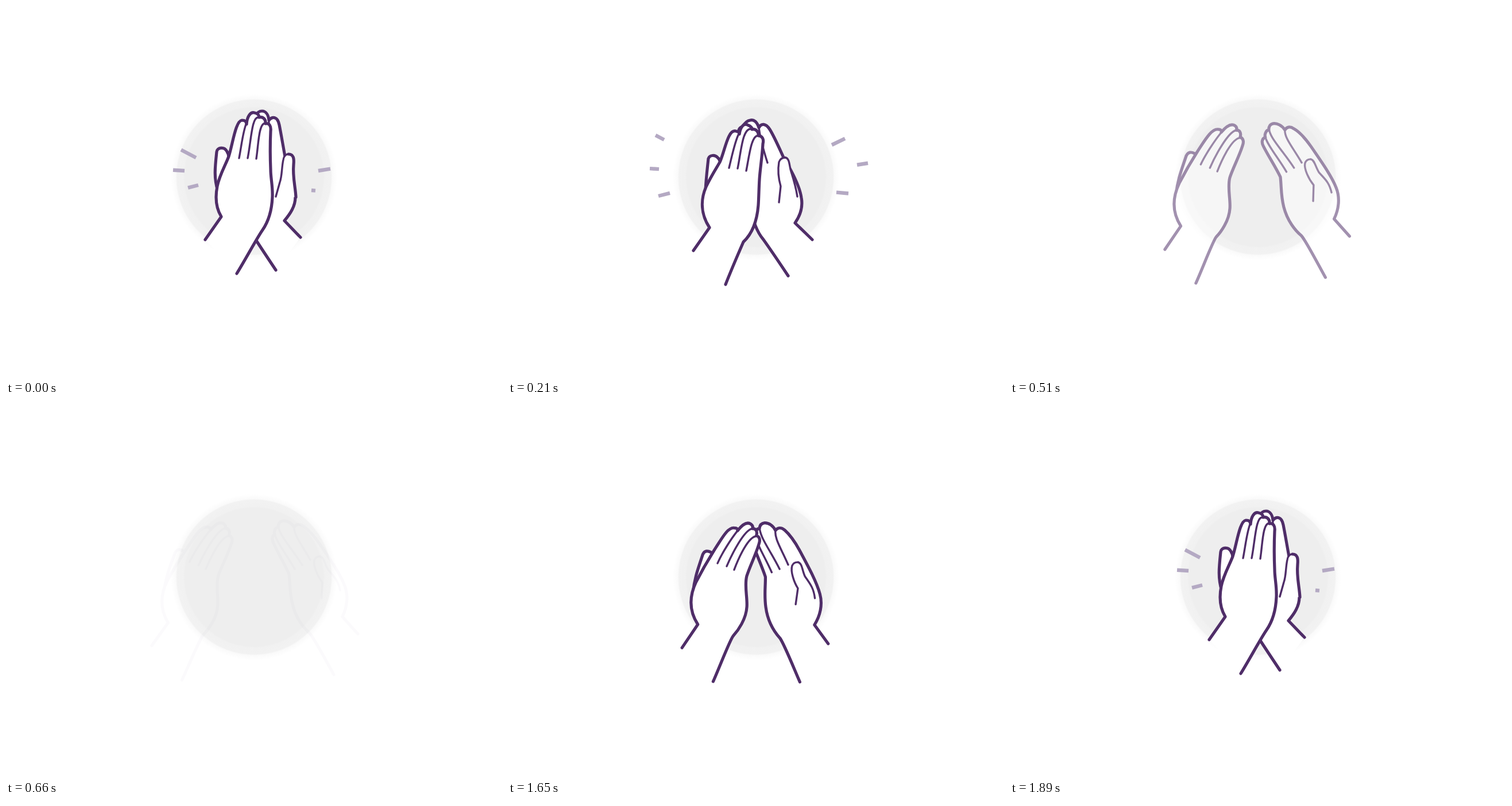
An HTML page for the animation above (1920 ms loop, 864 by 648 pixels).

```html
<!DOCTYPE html>
<html lang="en">
<head>
<meta charset="utf-8">
<title>Clapping hands</title>
<style>
  html, body { margin: 0; width: 100%; height: 100%; overflow: hidden; background: #fff; }
  svg { display: block; width: 100vw; height: 100vh; }
  #hands path { fill: none; stroke: #4f2d68; stroke-width: 5.2; stroke-linecap: round; stroke-linejoin: round; }
  #hands .solid { fill: #fff; }
  #hands .bare { fill: #fff; stroke: none; }
  #hands .thin { stroke-width: 3.4; }
  #rays line { stroke: #b4a9c3; stroke-width: 6.4; }
</style>
</head>
<body>
<svg viewBox="0 0 864 648">
  <defs>
    <radialGradient id="glow">
      <stop offset=".83" stop-color="#eee"/>
      <stop offset=".85" stop-color="#f1f1f1"/>
      <stop offset=".925" stop-color="#f2f2f2"/>
      <stop offset=".94" stop-color="#fafafa"/>
      <stop offset="1" stop-color="#fff"/>
    </radialGradient>
  </defs>
  <circle cx="432" cy="298" r="145" fill="url(#glow)"/>
  <g id="rays"></g>
  <g id="hands">
    <g id="right">
      <path class="solid"/><path class="thin"/><path class="bare"/><path class="thin"/><path class="thin"/>
    </g>
    <g id="left">
      <path class="solid"/><path class="solid"/><path class="thin"/>
    </g>
  </g>
</svg>
<script>
const LOOP = 1920, STEP = 30, GONE = 660, BACK = 1530;
const TIMES = [1530, 1650, 1890, 1920, 2130, 2310, 2580];
const RAY_TIMES = [1830, 1890, 1920, 2130, 2310, 2370];
const NUM = /-?\d+(\.\d+)?/g;

// Left hand parts: thumb | palm | finger lines
const LEFT = {
  shut: `M369 322C362 300 364 282 367 254C368 246 380 245 384 252C387 256 388 260 388 264|
    M347 407L375 367C366 352 364 334 368 314C372 294 382 278 388 262C395 240 400 200 411 199
    C417 199 419 202 419 206C420 192 426 184 433 186C438 187 441 190 441 194
    C448 192 453 198 452 205C459 203 462 210 461 218C460 240 460 262 461 285
    C461 300 465 315 464 333C463 356 458 374 447 390C436 406 418 440 402 466|
    M419 204C413 216 410 245 406 265M440 194C428 192 427 235 421 265M452 204C440 204 440 240 436 266`,
  half: `M344 322C345 300 347 285 349 266C351 259 361 259 365 264C368 266 369 269 370 273|
    M323 426L351 386C336 363 335 338 345 315C354 296 362 284 369 272C378 252 383 214 397 218
    C402 219 404 221 403 223C405 210 411 204 417 207C423 209 426 213 425 215
    C432 213 437 220 436 226C443 226 446 232 444 240C443 260 439 285 438 302
    C437 318 437 332 436 347C434 372 426 396 410 411C400 434 388 462 379 485|
    M403 221C396 232 390 262 385 282M424 214C408 212 406 255 400 283M436 226C424 224 420 262 415 287`,
  open: `M303 330C305 304 313 284 319 264C322 257 328 257 333 260C335 261 335 262 335 262|
    M285 427L312 386C296 362 297 336 308 312C318 292 334 264 344 248C354 232 363 216 373 217
    C378 217 380 219 379 222C388 210 396 206 402 210C405 212 406 215 405 218
    C411 217 414 223 412 230C417 231 419 237 417 243C412 262 401 284 396 301
    C392 318 398 338 397 354C396 376 382 396 374 405C369 410 350 462 340 485|
    M379 222C368 236 352 262 345 279M404 218C390 222 370 262 361 284M412 231C398 232 382 268 374 290`
};

// Right hand parts: palm | finger lines | inner thumb | outer thumb
const RIGHT = {
  shut: `M513 403L485 374C495 362 504 349 504 333C500 312 494 290 486 262C482 240 479 222 476 207
    C473 192 464 192 458 199C457 190 453 183 446 183C441 183 438 185 436 190
    C430 192 428 200 430 206C430 210 430 215 431 222C432 250 432 280 434 302
    C434 320 432 340 426 358C424 385 428 396 435 407C446 424 458 442 470 460|
    M458 200C457 215 457 230 457 250M436 190C437 215 440 240 442 270M430 206C430 230 432 250 434 270|
    M470 332L477 307C481 296 480 282 483 268C484 261 488 258 492 258|
    M492 258C501 258 502 266 501 276C499 298 504 314 505 333`,
  half: `M530 407L500 378C509 365 514 350 511 334C508 314 496 290 480 264C471 244 463 226 456 215
    C449 204 441 204 437 212C434 202 428 197 422 199C416 200 412 204 409 210
    C402 212 400 218 404 222C408 224 410 230 412 240C414 260 415 280 416 300
    C418 318 421 336 424 352C425 372 434 394 445 407C455 421 472 446 488 470|
    M437 212C439 228 444 248 452 273M409 210C412 230 420 250 428 280M404 222C407 240 413 260 418 285|
    M472 342L475 314C471 300 470 284 472 272C474 266 479 264 483 264|
    M483 264C491 265 490 280 493 288C498 304 502 318 504 332`,
  open: `M572 404L545 374C553 358 556 338 549 320C541 299 523 273 506 248C495 232 484 221 477 216
    C470 211 464 213 461 218C456 210 448 206 441 207C436 208 433 212 433 218
    C428 218 425 226 427 231C422 233 422 240 425 246C432 262 444 282 452 300
    C454 318 453 332 458 352C464 377 478 394 488 403C496 412 517 452 530 475|
    M461 217C460 232 474 248 489 275M433 214C434 232 455 252 475 284M427 230C430 244 448 266 462 291|
    M509 342L510 314C502 304 494 286 496 276C498 270 503 269 506 269|
    M506 269C513 270 514 282 520 292C530 304 537 310 541 328`
};

// Each ray runs on y = y0 + k (x - x0); head and tail hold x at five moments
const RAYS = [
  { x0: 305, y0: 250.5, k: .53, head: [332, 305, 257, 255, 255], tail: [332, 331, 272, 255, 255] },
  { x0: 311, y0: 287, k: .06, head: [312, 291, 247, 232, 231], tail: [312, 311, 263, 234, 231] },
  { x0: 335, y0: 312, k: -.26, head: [336, 317, 262, 243, 243], tail: [336, 335, 282, 243, 243] },
  { x0: 564, y0: 242, k: -.48, head: [525, 525, 587, 603, 604], tail: [525, 525, 564, 601, 604] },
  { x0: 544, y0: 287, k: -.16, head: [543, 565, 627, 629, 629], tail: [543, 544, 608, 629, 629] },
  { x0: 532, y0: 321, k: .09, head: [531, 539, 593, 617, 618], tail: [531, 532, 572, 610, 618] }
];

const $ = id => document.getElementById(id);
const clamp = v => Math.min(1, Math.max(0, v));
const numbers = path => path.match(NUM).map(Number);

// Small turn about (cx, cy) followed by a shift
function place(pts, cx, cy, turn, dx, dy) {
  return pts.map((v, i) => i % 2
    ? v + turn * (pts[i - 1] - cx) + dy
    : v - turn * (pts[i + 1] - cy) + dx);
}

function makeHand(id, set, cx, cy, enter, meet, leave) {
  const [shut, half, open] = [set.shut, set.half, set.open].map(numbers);
  const moved = m => place(open, cx, cy, ...m);
  return {
    paths: [...$(id).children],
    shape: set.open,
    keys: [moved(enter), moved(meet), shut, shut, half, open, moved(leave)]
  };
}

const left = makeHand('left', LEFT, 350, 345, [.055, -4.5, -2.2], [.013, 19.2, -5], [.04, -28, -7]);
const right = makeHand('right', RIGHT, 490, 340, [.07, 28.5, 1.2], [.103, -7.7, 1.6], [0, 41, -7]);

function segment(times, u) {
  let i = 0;
  while (i < times.length - 2 && u >= times[i + 1]) i++;
  return i;
}

function linear(times, vals, u) {
  const i = segment(times, u);
  return vals[i] + (vals[i + 1] - vals[i]) * clamp((u - times[i]) / (times[i + 1] - times[i]));
}

// Monotone cubic through the keys, without overshoot
function smooth(times, vals, u) {
  const i = segment(times, u), h = times[i + 1] - times[i], s = clamp((u - times[i]) / h);
  const slope = j => (vals[j + 1] - vals[j]) / (times[j + 1] - times[j]);
  const tangent = j => {
    if (j === 0) return slope(0);
    if (j === times.length - 1) return slope(j - 1);
    const a = slope(j - 1), b = slope(j);
    return a * b > 0 ? 2 * a * b / (a + b) : 0;
  };
  const a = vals[i], b = vals[i + 1], s2 = s * s, s3 = s2 * s;
  return a + (b - a) * (3 * s2 - 2 * s3)
    + h * (tangent(i) * (s3 - 2 * s2 + s) + tangent(i + 1) * (s3 - s2));
}

function poseParts(hand, u) {
  let n = 0;
  return hand.shape.replace(NUM, () => {
    const vals = hand.keys.map(k => k[n]);
    n++;
    return smooth(TIMES, vals, u).toFixed(2);
  }).split('|').map(p => p.trim());
}

const setPaths = (hand, parts) => hand.paths.forEach((p, i) => p.setAttribute('d', parts[i]));

const rayLines = RAYS.map(() =>
  $('rays').appendChild(document.createElementNS('http://www.w3.org/2000/svg', 'line')));

function drawRay(ray, line, u) {
  ['head', 'tail'].forEach((end, i) => {
    const [a, b, ...rest] = ray[end];
    const x = linear(RAY_TIMES, [a, b, b, ...rest], u);
    line.setAttribute('x' + (i + 1), x);
    line.setAttribute('y' + (i + 1), ray.y0 + ray.k * (x - ray.x0));
  });
}

function draw(ms) {
  let t = Math.floor(ms % LOOP / STEP) * STEP;
  if (t > GONE && t < BACK) t = GONE;
  const u = t < BACK ? t + LOOP : t;

  setPaths(left, poseParts(left, u));
  const [palm, lines, inner, outer] = poseParts(right, u);
  setPaths(right, [palm, lines, inner + outer.replace('M', 'L'), inner, outer]);
  right.paths[4].style.strokeWidth = linear(TIMES, [3.4, 3.4, 5.2, 5.2, 3.4, 3.4, 3.4], u);

  $('hands').setAttribute('opacity', linear([1530, 1620, 2289, 2580], [.37, 1, 1, .014], u));
  RAYS.forEach((ray, i) => drawRay(ray, rayLines[i], u));
}

const start = performance.now();
function tick() {
  draw(performance.now() - start);
  requestAnimationFrame(tick);
}
tick();
</script>
</body>
</html>
```
